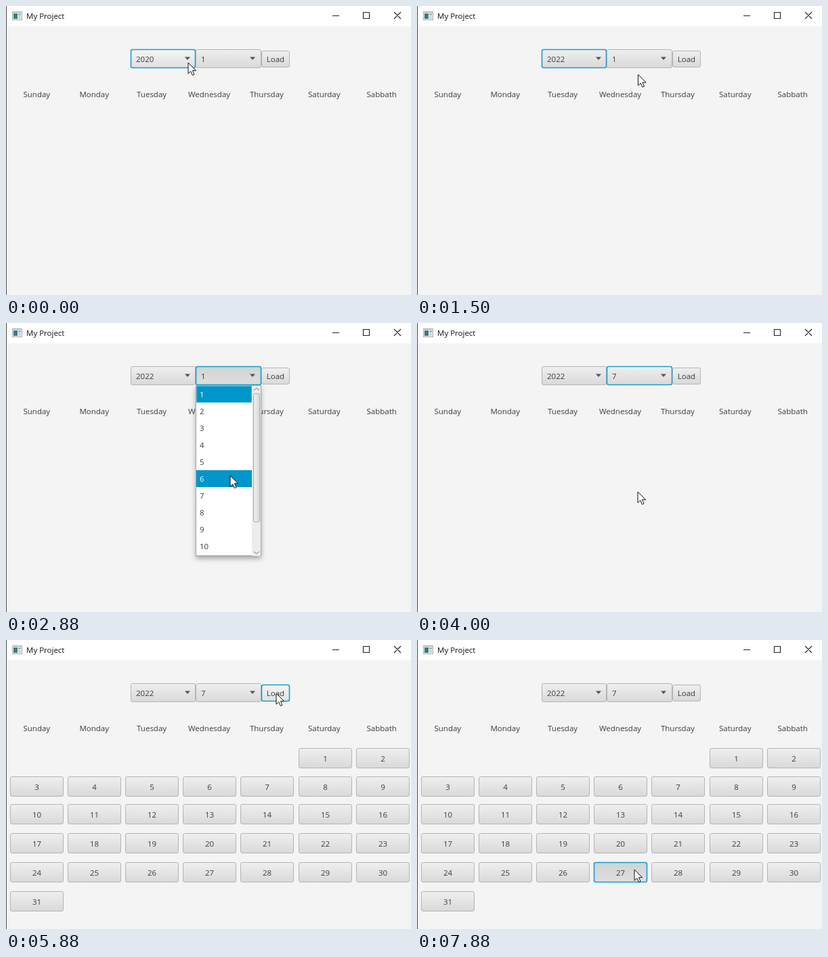
An HTML page for the animation above (8 s loop, 598 px wide and 428 px high).

```html
<!DOCTYPE html>
<html lang="en">
<head>
<meta charset="utf-8">
<title>My Project</title>
<style>
  html, body { margin: 0; width: 100%; height: 100%; overflow: hidden; background: #f4f4f4; }
  svg { display: block; width: 598px; height: 428px; }
  text { font: 11.5px "Open Sans", "Noto Sans", sans-serif; fill: #3c3c3c; }
  .mid { text-anchor: middle; }
  .ctl rect { fill: url(#face); stroke: #b4b4b4; }
  .ctl path { fill: #555; }
  .ctl.hover rect { fill: url(#light); }
  .ctl.armed rect { fill: url(#dark); }
  .ctl.focus rect { stroke: #14a0d0; stroke-width: 1.6; }
  .row rect { fill: #fff; }
  .row.on rect { fill: #0096c9; }
  .row.on text { fill: #fff; }
</style>
</head>
<body>
<svg id="stage" viewBox="0 0 598 428">
  <defs>
    <linearGradient id="face" x2="0" y2="1"><stop stop-color="#efefef"/><stop offset="1" stop-color="#d9d9d9"/></linearGradient>
    <linearGradient id="light" x2="0" y2="1"><stop stop-color="#f5f5f5"/><stop offset="1" stop-color="#e0e0e0"/></linearGradient>
    <linearGradient id="dark" x2="0" y2="1"><stop stop-color="#d3d3d3"/><stop offset="1" stop-color="#dedede"/></linearGradient>
    <linearGradient id="thumb"><stop stop-color="#efefef"/><stop offset="1" stop-color="#d8d8d8"/></linearGradient>
    <filter id="shadow" x="-20%" y="-20%" width="140%" height="150%">
      <feDropShadow dx="0" dy="4" stdDeviation="3.5" flood-opacity=".32"/>
    </filter>
  </defs>
  <rect width="598" height="428" fill="#f4f4f4"/>
  <rect width="598" height="30" fill="#fff"/>
  <rect width="1" height="428" fill="#4a4a4a"/>
  <g id="icon">
    <rect x="9.5" y="8.5" width="14" height="12" fill="#f3f5f6" stroke="#a3a8ac"/>
    <rect x="9" y="8" width="15" height="2" fill="#b4babe"/>
    <rect x="11" y="11" width="6" height="8" fill="#3d7a80"/>
    <rect x="18" y="11" width="4" height="3" fill="#a8b4ba"/>
    <rect x="18" y="15" width="4" height="4" fill="#cbd3d7"/>
  </g>
  <text x="30" y="19" style="fill:#111">My Project</text>
  <path d="M482 14.5h10M527.5 9.5h9v9h-9zM573 9l10 10M583 9l-10 10" fill="none" stroke="#222" stroke-width="1.1"/>
  <g id="ui"></g>
  <path id="cursor" d="M0 0V16.2L3.8 12.7L6.4 18.6L9 17.5L6.5 11.7H11.6Z" fill="#fff" stroke="#111" stroke-linejoin="round"/>
</svg>
<script>
const LOOP = 8000, STEP = 125;
const ui = document.getElementById("ui");
const cursor = document.getElementById("cursor");

function add(parent, tag, attrs, text) {
  const el = document.createElementNS("http://www.w3.org/2000/svg", tag);
  for (const k in attrs) el.setAttribute(k, attrs[k]);
  if (text !== undefined) el.textContent = text;
  return parent.appendChild(el);
}

function control(parent, x, y, w, h, label, combo) {
  const g = add(parent, "g", { class: "ctl" });
  add(g, "rect", { x: x + .5, y: y + .5, width: w - 1, height: h - 1, rx: 2.5 });
  const ty = y + h / 2 + 4.5;
  const text = add(g, "text", combo ? { x: x + 8, y: ty } : { x: x + w / 2, y: ty, class: "mid" }, label);
  if (combo) add(g, "path", { d: `M${x + 80} ${y + 11.5}h8l-4 4.5z` });
  return { g, text, x, y, w, h };
}

function popup(x, w, rowW, labels) {
  const g = add(ui, "g", {}), h = labels.length * 25 + 2;
  add(g, "rect", { x: x + .5, y: 92.5, width: w - 1, height: h, fill: "#fff", stroke: "#a9a9a9", filter: "url(#shadow)" });
  const rows = labels.map((label, i) => {
    const y = 93 + i * 25, row = add(g, "g", { class: "row" });
    add(row, "rect", { x: x + 1, y, width: rowW, height: 25 });
    add(row, "text", { x: x + 6, y: y + 17 }, label);
    return row;
  });
  add(g, "rect", { x: x + 1.5, y: 93.5, width: rowW - 1, height: 24, fill: "none", stroke: "#6cc1e0", "stroke-opacity": .7 });
  return { g, rows, x, rowW };
}

const days = ["Sunday", "Monday", "Tuesday", "Wednesday", "Thursday", "Saturday", "Sabbath"];
days.forEach((day, i) => add(ui, "text", { x: 45.3 + i * 84.9, y: 135, class: "mid" }, day));

const year = control(ui, 184, 64, 96, 28, "2020", true);
const month = control(ui, 280, 64, 97, 28, "1", true);
const load = control(ui, 377, 66, 42, 25, "Load");

const calendar = add(ui, "g", {});
const rowTops = [160, 202, 243, 286, 329, 372];
const dates = Array.from({ length: 31 }, (_, i) => {
  const cell = i + 5;
  return control(calendar, Math.round(5.8 + (cell % 7) * 85.15), rowTops[Math.floor(cell / 7)], 79, 30, i + 1);
});

const years = popup(184, 96, 94, ["2020", "2021", "2022"]);
const months = popup(280, 97, 82, Array.from({ length: 10 }, (_, i) => i + 1));
add(months.g, "rect", { x: 363, y: 93, width: 13, height: 252, fill: "#ececec" });
add(months.g, "rect", { x: 365.5, y: 104.5, width: 9, height: 190, rx: 2, fill: "url(#thumb)", stroke: "#aaa" });
add(months.g, "path", { d: "M366 99.5l4-3l4 3M366 338.5l4 3l4-3", fill: "none", stroke: "#777" });

// Pointer stops: ms, x, y
const path = [
  [0, 269, 84], [250, 268, 88], [500, 258, 118], [750, 244, 150], [875, 241, 156],
  [1125, 241, 156], [1375, 292, 122], [1625, 361, 81], [1750, 371, 77],
  [2500, 371, 77], [2625, 362, 112], [2750, 343, 180], [2875, 331, 226], [3125, 327, 246], [3250, 326, 250],
  [4625, 326, 250], [4750, 350, 224], [4875, 400, 168], [5000, 440, 112], [5125, 428, 89], [5250, 406, 80], [5375, 399, 79],
  [6375, 399, 79], [6625, 386, 138], [6875, 352, 254], [7125, 324, 330], [7250, 321, 340], [8000, 321, 340]
];

function pointer(t) {
  let i = 1;
  while (path[i][0] < t) i++;
  const [t0, x0, y0] = path[i - 1], [t1, x1, y1] = path[i];
  const k = (t - t0) / (t1 - t0);
  return [x0 + (x1 - x0) * k, y0 + (y1 - y0) * k];
}

const show = (el, on) => el.setAttribute("display", on ? "inline" : "none");

function draw(now) {
  const t = Math.floor((now % LOOP) / STEP) * STEP;
  const [px, py] = pointer(t);
  const yearOpen = t >= 125 && t < 1125, monthOpen = t >= 2375 && t < 4000;
  const focus = t < 2375 ? year : t < 5625 ? month : t < 7750 ? load : dates[26];
  const armed = yearOpen ? year : monthOpen ? month : t === 5625 ? load : t >= 7750 ? dates[26] : null;

  for (const c of [year, month, load, ...dates]) {
    const over = px >= c.x && px < c.x + c.w && py >= c.y && py < c.y + c.h;
    c.g.classList.toggle("hover", over);
    c.g.classList.toggle("armed", c === armed);
    c.g.classList.toggle("focus", c === focus);
  }
  for (const p of [years, months]) {
    const over = px > p.x && px < p.x + p.rowW ? Math.floor((py - 93) / 25) : -1;
    p.rows.forEach((r, i) => r.classList.toggle("on", i === 0 || i === over));
  }
  year.text.textContent = t < 1125 ? "2020" : "2022";
  month.text.textContent = t < 4000 ? "1" : "7";
  show(years.g, yearOpen);
  show(months.g, monthOpen);
  show(calendar, t >= 5750);
  cursor.setAttribute("transform", `translate(${px.toFixed(1)} ${py.toFixed(1)})`);
}

const start = performance.now();
function tick() {
  draw(performance.now() - start);
  requestAnimationFrame(tick);
}
draw(0);
requestAnimationFrame(tick);
</script>
</body>
</html>
```
